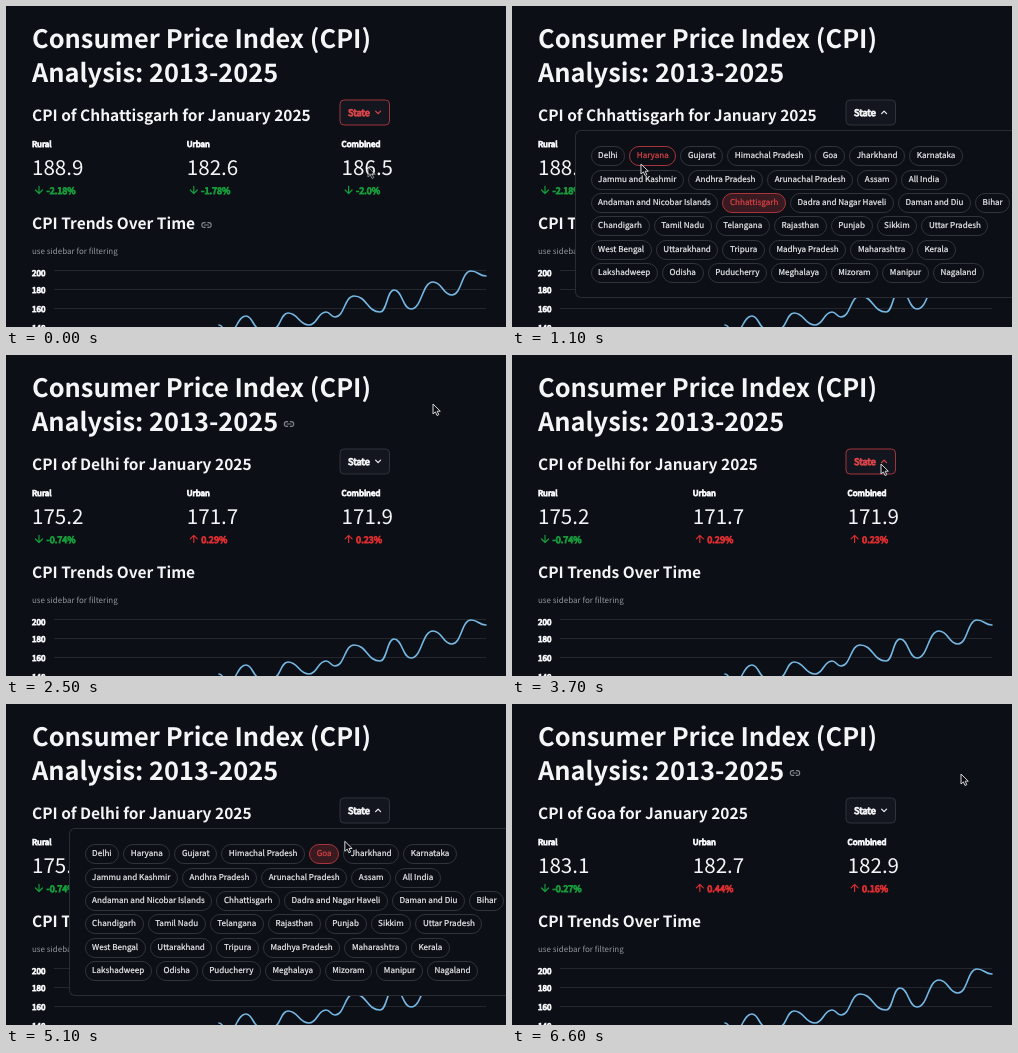
Animation, 500 px wide and 321 px high, one loop 6.7 s. Source, as an HTML page:

```html
<!DOCTYPE html>
<html lang="en">
<head>
<meta charset="utf-8">
<style>
html, body { margin: 0; width: 100%; height: 100%; overflow: hidden; background: #0c0f16; }
body { position: relative; }
body, text { font-family: "Noto Sans CJK JP", "Noto Sans CJK SC", "Noto Sans CJK", "Noto Sans", sans-serif; text-rendering: geometricPrecision; }
svg { position: absolute; left: 0; top: 0; width: 100%; height: 100%; overflow: hidden; }
text { fill: #f4f5f7; }
.title { font-size: 25.4px; font-weight: 700; }
.head { font-size: 15.5px; font-weight: 600; }
.label { font-size: 8px; }
.value { font-size: 20.6px; }
.delta { font-size: 9.1px; }
.note { font-size: 8px; fill: #92959b; }
.label, .delta, .pill { -webkit-text-stroke: 0.2px; }
.label { stroke: #f4f5f7; }
.line { fill: none; stroke-linecap: round; stroke-linejoin: round; }
#popup { position: absolute; box-sizing: border-box; left: 63px; right: 0; top: 124px; height: 168px; overflow: hidden;
  background: #0c0f16; border: 1px solid #292c33; border-right: 0; border-radius: 6px 0 0 6px; }
.row { position: absolute; left: 14.5px; display: flex; gap: 4px; white-space: nowrap; }
.pill { box-sizing: border-box; height: 20px; padding: 0 6.6px; border: 1px solid #31343b; border-radius: 10px;
  font-size: 8.1px; line-height: 17px; color: #f0f1f3; }
.pill.hover, .pill.on { color: #dd4448; border-color: #a8343b; }
.pill.on { background: #381a20; }
</style>
</head>
<body>
<svg>
  <text class="title" x="26" y="42">Consumer Price Index (CPI)</text>
  <text class="title" x="26" y="76">Analysis: 2013-2025</text>
  <text class="head" id="heading" x="26" y="114.6"></text>
  <rect id="button" x="334" y="94" width="49.5" height="25" rx="4" fill="#13161e"/>
  <text id="state" class="delta" x="342" y="109.6">State</text>
  <path id="chevron" class="line" stroke-width="1.2"/>
  <g id="metrics"></g>
  <text class="head" x="26" y="223">CPI Trends Over Time</text>
  <text class="note" x="26" y="248">use sidebar for filtering</text>
  <defs>
    <path id="link" class="line" stroke="#85888f" stroke-width="1.1"
      d="M-1.300-2.400h-1a2.400 2.400 0 0 0 0 4.800h1m2.600 0h1a2.400 2.400 0 0 0 0-4.800h-1m-3.200 2.400h3.800"/>
  </defs>
  <use id="titleLink" href="#link" x="283" y="69"/>
  <use id="trendLink" href="#link" x="200.5" y="219"/>
  <g id="chart"></g>
</svg>
<div id="popup"></div>
<svg>
  <path id="cursor" d="M0 0V10L2.400 7.900L4 11.500L5.800 10.700L4.200 7.200H7.300Z" fill="#0a0b0e" stroke="#d5d7da"/>
</svg>
<script>
const LOOP = 6700;
const $ = id => document.getElementById(id);
const show = (el, on) => el.style.visibility = on ? "visible" : "hidden";

const rows = [
  "Delhi,Haryana,Gujarat,Himachal Pradesh,Goa,Jharkhand,Karnataka",
  "Jammu and Kashmir,Andhra Pradesh,Arunachal Pradesh,Assam,All India",
  "Andaman and Nicobar Islands,Chhattisgarh,Dadra and Nagar Haveli,Daman and Diu,Bihar",
  "Chandigarh,Tamil Nadu,Telangana,Rajasthan,Punjab,Sikkim,Uttar Pradesh",
  "West Bengal,Uttarakhand,Tripura,Madhya Pradesh,Maharashtra,Kerala",
  "Lakshadweep,Odisha,Puducherry,Meghalaya,Mizoram,Manipur,Nagaland"
];
const data = {
  Chhattisgarh: ["188.9 -2.18%", "182.6 -1.78%", "186.5 -2.0%"],
  Delhi: ["175.2 -0.74%", "171.7 0.29%", "171.9 0.23%"],
  Goa: ["183.1 -0.27%", "182.7 0.44%", "182.9 0.16%"]
};
// pointer moves: start, end, x, y
const moves = [
  [0, 300, 369, 108], [750, 1100, 129, 158], [1100, 1350, 97, 150], [1600, 2300, 427, 49],
  [2900, 3400, 369, 109], [4000, 4300, 374, 152], [4300, 4700, 318, 150], [5000, 5400, 449, 70]
];

$("popup").innerHTML = rows.map((row, i) =>
  `<div class="row" style="top:${15.3 + i * 23.3}px">` +
  row.split(",").map(name => `<div class="pill">${name}</div>`).join("") + "</div>").join("");
const pills = [...document.querySelectorAll(".pill")];

// Highs and lows of the curve, joined by smooth steps
const turns = [
  [213, 319], [222, 327], [240, 310], [254, 323], [267, 323], [282, 307], [303, 319], [320, 306], [329, 311],
  [348, 290], [374, 306], [388, 284], [405, 303], [427, 276], [446, 289], [465, 265], [480, 270]
];
const curve = turns.slice(1).map(([x, y], i) => {
  const [px, py] = turns[i], mid = (px + x) / 2;
  return `C${mid} ${py} ${mid} ${y} ${x} ${y}`;
}).join("");
$("chart").innerHTML = [200, 180, 160, 140].map((n, i) => {
  const y = 264.5 + i * 19;
  return `<path d="M48 ${y}H480" stroke="#24272e"/><text class="label" x="26" y="${y + (i ? 3 : 5.5)}">${n}</text>`;
}).join("") + `<path class="line" d="M${turns[0]}${curve}" stroke="#75b8e4" stroke-width="1.6"/>`;

let shown;
function setState(name) {
  if (shown === name) return;
  shown = name;
  $("heading").textContent = `CPI of ${name} for January 2025`;
  $("metrics").innerHTML = data[name].map((pair, i) => {
    const [value, delta] = pair.split(" ");
    const x = 26 + i * 154.8, down = delta[0] === "-", color = down ? "#159b3b" : "#d92d30";
    const arrow = down ? "m-3.500 3.700l3.500 3.500l3.500-3.500" : "m-3.500 3.500l3.500-3.500l3.500 3.500";
    return `<text class="label" x="${x}" y="141">${["Rural", "Urban", "Combined"][i]}</text>
      <text class="value" x="${x}" y="168.600">${value}</text>
      <path class="line" d="M${x + 7} 180.300v7.200v-7.200${arrow}" stroke="${color}" stroke-width="1.2"/>
      <text class="delta" x="${x + 14.5}" y="187.500" style="fill:${color};stroke:${color}">${delta}</text>`;
  }).join("");
}

function pointer(t) {
  let x = 362, y = 161;
  for (const [a, b, u, v] of moves) {
    const k = Math.min(1, Math.max(0, (t - a) / (b - a))), e = k * k * (3 - 2 * k);
    x += (u - x) * e;
    y += (v - y) * e;
  }
  return [x, y];
}

function draw(t) {
  const [x, y] = pointer(t);
  const open = t >= 500 && t < 2400 || t >= 3800 && t < 5500;
  const up = open || t >= 3600 && t < 3800;
  const hot = t < 800 || x > 334 && x < 384 && y > 93 && y < 120;
  const ink = hot ? "#d8444a" : "#f0f1f3";
  const picked = t < 1500 ? "Chhattisgarh" : t < 4900 ? "Delhi" : "Goa";
  setState(t < 2000 ? "Chhattisgarh" : t < 6200 ? "Delhi" : "Goa");

  $("button").setAttribute("stroke", hot ? "#a0343b" : "#30333a");
  $("state").style.fill = $("state").style.stroke = ink;
  $("chevron").setAttribute("stroke", ink);
  $("chevron").setAttribute("d", up ? "M369.600 107.600l2.500-2.500l2.500 2.500" : "M369.600 105.200l2.500 2.500l2.500-2.500");

  show($("titleLink"), y < 86);
  show($("trendLink"), t < 200);
  show($("popup"), open);
  for (const pill of pills) {
    const r = pill.getBoundingClientRect();
    const over = x >= r.left && x <= r.right && y >= r.top && y <= r.bottom;
    pill.className = "pill" + (over ? " hover" : "") + (pill.textContent === picked ? " on" : "");
  }
  $("cursor").setAttribute("transform", `translate(${x} ${y})`);
  $("cursor").setAttribute("opacity", t < 100 ? 0.6 : 1);
}

const start = performance.now();
function tick() {
  draw((performance.now() - start) % LOOP);
  requestAnimationFrame(tick);
}
tick();
</script>
</body>
</html>
```
